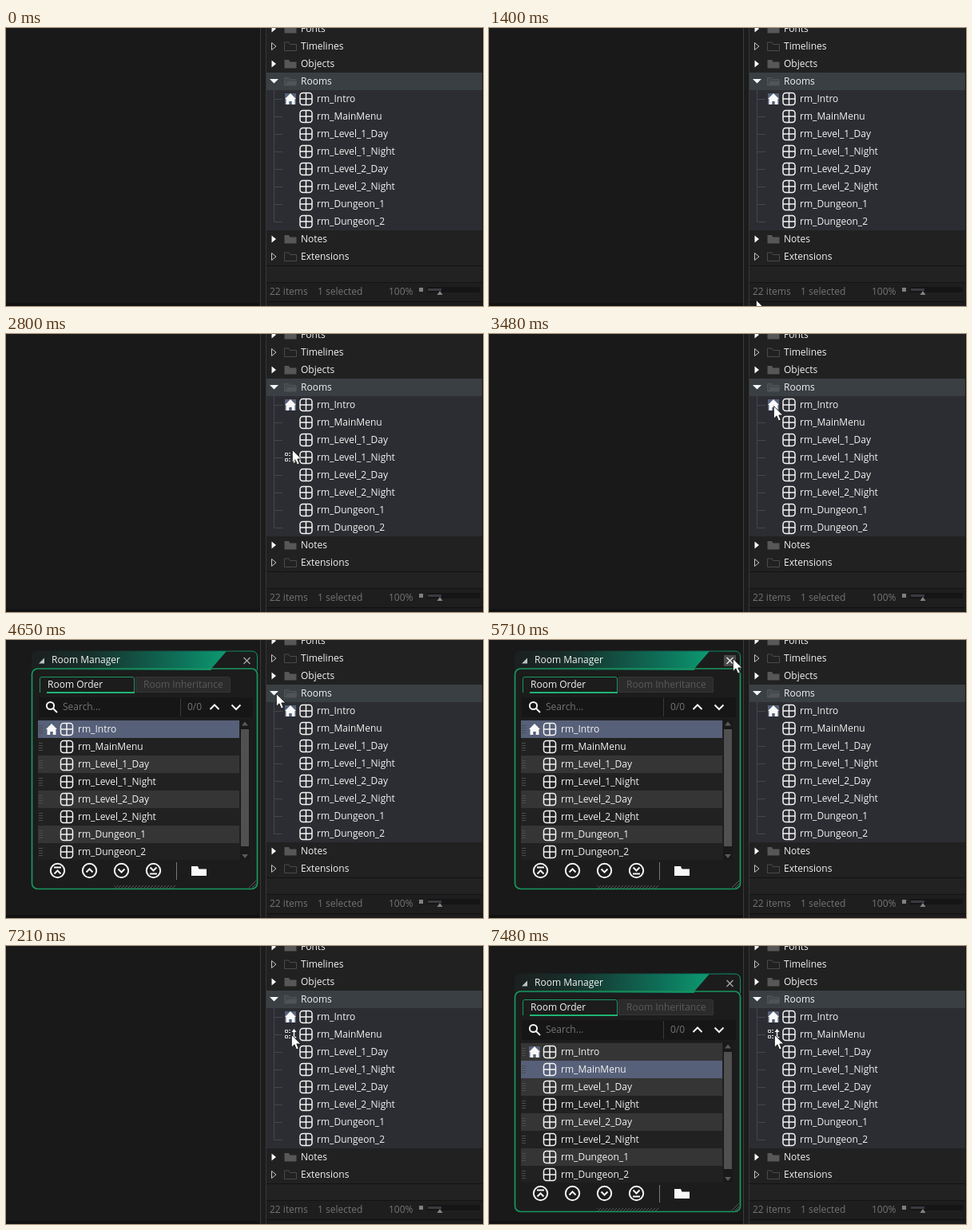
Write an HTML page that moves like this. It is 597x349 px and loops after 8000 ms.

```html
<!DOCTYPE html>
<html lang="en">
<head>
<meta charset="utf-8">
<title>Room order</title>
<style>
  html, body { margin: 0; width: 100%; height: 100%; overflow: hidden; background: #191919; }
  svg { display: block; width: 597px; height: 349px; }
  text { font: 12px "Open Sans", "Noto Sans", sans-serif; fill: #f2f2f2; white-space: pre; }
  .dim { fill: #747474; }
  .off { fill: #5a5a5a; }
  .line { fill: none; stroke: #f4f4f4; stroke-width: 1.5; }
  .bold { fill: none; stroke: #f4f4f4; stroke-width: 2; }
  .white { fill: #f8f8f8; }
  .green { fill: none; stroke: #18975f; }
  .tree { fill: none; stroke: #46474c; }
</style>
</head>
<body>
<svg id="stage" viewBox="0 0 597 349">
  <defs>
    <linearGradient id="title">
      <stop offset="0" stop-color="#1b1f1f"/>
      <stop offset=".3" stop-color="#17302b"/>
      <stop offset=".75" stop-color="#0e6f58"/>
      <stop offset="1" stop-color="#0c9a72"/>
    </linearGradient>
    <pattern id="hatch" width="4" height="4" patternUnits="userSpaceOnUse">
      <path d="M0 4L4 0" stroke="#5a5a5a"/>
    </pattern>
    <g id="room" class="line">
      <rect x="-7.5" y="-7.5" width="15" height="15" rx="3.5"/>
      <path d="M0-7.5V7.5M-7.5 0H7.5"/>
    </g>
    <g id="home">
      <rect x="-7" y="-7" width="14" height="14" fill="#566079"/>
      <path class="white" d="M0-7L7 0H5.5V7H1.7V3H-1.7V7H-5.5V0H-7Z"/>
    </g>
    <g id="order">
      <path fill="none" stroke="#d8d8d8" d="M-6.5-5.5h3v3h-3zM-6.5 1.5h3v3h-3z"/>
      <path stroke="#d8d8d8" d="M-2-5.5h2M-2-2.5h2M-2 1.5h2M-2 4.5h2"/>
      <path class="line" d="M4.5-5V5"/>
      <path class="white" d="M4.5-7L7.5-3H1.5ZM4.5 7L7.5 3H1.5Z"/>
    </g>
    <path id="folder" d="M-7.5-5H-2L-.5-2.5H7.5V5.5H-7.5Z"/>
  </defs>
  <g id="tree"></g>
  <use id="hover" href="#order"/>
  <g id="panel"></g>
  <path id="cursor" fill="#fff" stroke="#111" stroke-width=".8"
        d="M.4.5V16.2L4 12.8L6.5 18.9L9.2 17.8L6.8 11.9H11.8Z"/>
</svg>
<script>
const $ = id => document.getElementById(id);
const rooms = ["Intro", "MainMenu", "Level_1_Day", "Level_1_Night",
  "Level_2_Day", "Level_2_Night", "Dungeon_1", "Dungeon_2"].map(n => "rm_" + n);

const text = (x, y, s, cls = "") => `<text x="${x}" y="${y}" class="${cls}">${s}</text>`;
const rect = (x, y, w, h, fill, more = "") =>
  `<rect x="${x}" y="${y}" width="${w}" height="${h}" fill="${fill}" ${more}/>`;
const path = (d, more) => `<path d="${d}" ${more}/>`;
const use = (id, x, y, more = "") => `<use href="#${id}" x="${x}" y="${y}" ${more}/>`;

// A closed folder in the asset tree; empty ones are outlined.
function branch(name, y, empty) {
  const look = empty ? 'fill="none" stroke="#4a4a4a"' : 'fill="#575757"';
  const mark = empty ? 'fill="none" stroke="#c8c8c8"' : 'class="white"';
  return path(`M332.5 ${y - 4.5}L338 ${y}L332.5 ${y + 4.5}Z`, mark) +
    use("folder", 356, y, look) + text(369, y + 4, name);
}

function treeMarkup() {
  let s = rect(0, 345, 318, 4, "#121212") +
    rect(318, 0, 279, 349, "#1c1c1c") + rect(318, 0, 1, 349, "#3a3a3a") +
    rect(325, 0, 1, 349, "#363636") + rect(326, 0, 271, 298, "#212121") +
    rect(326, 298, 271, 1, "#121212") + rect(326, 299, 271, 20, "#222") +
    rect(326, 319, 271, 1, "#141414") + rect(326, 320, 271, 23, "#1e1e1e") +
    rect(326, 343, 271, 1, "#101010") +
    rect(326, 56, 270, 22, "#3a3f43") + rect(326, 78, 270, 176, "#2c2d32") +
    rect(596, 0, 1, 349, "#151515") +
    branch("Fonts", 1) + branch("Timelines", 23, true) + branch("Objects", 45) +
    branch("Notes", 265) + branch("Extensions", 287, true) +
    path("M330 64H341L335.5 69.5Z", 'class="white"') +
    path("M348.5 72V62.5H354L355.5 64.5H363V72Z", 'fill="#45494c" stroke="#505457"') +
    path("M349 72L352 67H364L363 72Z", 'fill="#505457"') +
    text(369, 71, "Rooms") + path("M335.5 78V243", 'class="tree"');
  rooms.forEach((name, i) => {
    const y = 89 + 22 * i;
    s += path(`M335.5 ${y + .5}H346`, 'class="tree"') + use("room", 375.5, y) + text(389, y + 4, name);
  });
  return s + use("home", 356, 89) +
    text(330, 335, "22 items", "dim") + text(390, 335, "1 selected", "dim") +
    text(479, 335, "100%", "dim") + rect(517, 326, 5, 5, "#808080") +
    rect(527, 325, 66, 7, "#151515") + rect(528, 327, 17, 3, "#3a3a42") +
    path("M539.5 335L543 330L546.5 335Z", 'fill="#858585"');
}

function panelMarkup() {
  let s = rect(32, 14, 283, 299, "#1c1c1c", 'rx="8"') +
    path("M32 38V21Q32 14 39 14H276L257 36V38Z", 'fill="url(#title)"') +
    path("M32.5 38V21Q32.5 14 39.5 14H307Q314.5 14 314.5 21V38", 'fill="none" stroke="url(#title)"') +
    rect(32.5, 36, 282, 276.5, "#1c1c1c", 'rx="7" class="green" stroke-width="1.7"') +
    path("M41 29.5L48 22.5V29.5Z", 'fill="#b9c2bf"') + text(57, 29, "Room Manager") +
    '<rect id="glow" x="294" y="19" width="15" height="14"/>' +
    '<path id="close" d="M297.5 22L305.5 30M305.5 22L297.5 30" stroke-width="1.3"/>' +
    path("M162.5 46.5H278Q280.5 46.5 280.5 49V65.5H162.5Z", 'fill="#2b2b2b" stroke="#343434"') +
    path("M42.5 66V48.5Q42.5 46.5 45 46.5H158Q160.5 46.5 160.5 49V66", 'class="green"') +
    rect(51, 65, 110, 2, "#1fb574") +
    text(52, 60, "Room Order") + text(172, 60, "Room Inheritance", "off") +
    rect(41, 72, 268, 25, "#161616") + rect(218, 73, 1, 23, "#3a3a3a") +
    '<circle class="bold" cx="55.5" cy="82.5" r="4.6"/>' + path("M59 86L64 91", 'class="bold"') +
    text(71, 88, "Search...", "dim") + text(227, 88, "0/0", "dim") +
    path("M255.5 87L261 81.5L266.5 87M282.5 81.5L288 87L293.5 81.5", 'class="bold"') +
    rect(40, 100, 265, 176, "#212121");
  rooms.forEach((name, i) => {
    const y = 112 + 22 * i, h = i == 7 ? 21 : 22;
    s += `<rect class="row" x="40" y="${y - 11}" width="252" height="${h}"/>`;
    for (let k = -5; k <= 4; k += 3) s += rect(41, y + k, 5, 1, "#4c4c4c");
    s += use("room", 76, y) + text(90, y + 4, name);
  });
  s += use("home", 57, 112) +
    rect(293, 100, 12, 176, "#191919") + rect(294, 112, 10, 147, "#505050") +
    path("M295 107.5L299 102.5L303 107.5ZM295 269L299 274L303 269Z", 'fill="#5a5a5a"');
  const arrows = ["M-4.5-4H4.5M-4 4L0 0L4 4", "M-4 2L0-2L4 2", "M-4-2L0 2L4-2", "M-4.5 4H4.5M-4-4L0 0L4-4"];
  arrows.forEach((d, i) => {
    s += `<g class="bold" transform="translate(${64.5 + 40 * i} 289.5)"><circle r="8.7"/>${path(d, "")}</g>`;
  });
  return s + rect(213, 279, 1, 22, "#777") +
    path("M232 284H240L241.5 287.5H251V296H232Z", 'class="white"') +
    rect(135, 308, 77, 4, "url(#hatch)") +
    path("M304 311L313 302M308 311L313 306", 'stroke="#5a5a5a"');
}

$("tree").innerHTML = treeMarkup();
$("panel").innerHTML = panelMarkup();
const rows = document.querySelectorAll(".row");

// Pointer moves: start, end, steps, from, to, acceleration.
const moves = [
  [1400, 2120, 9, [333, 345], [361, 237], 1],
  [2210, 2980, 10, [361, 237], [357, 120], 1],
  [3070, 3480, 6, [357, 120], [356, 90], 1],
  [4380, 4960, 8, [356, 91], [305, 23], 1.5],
  [6070, 6760, 9, [305, 23], [355, 111], 1],
  [7030, 7210, 2, [355, 111], [357, 111], 1]
];

function pointer(t) {
  const m = moves.filter(m => t >= m[0]).pop();
  if (!m) return null;
  const [start, end, n, a, b, power] = m;
  const k = Math.min(n - 1, Math.floor((t - start) / (end - start) * (n - 1) + 1e-6));
  const u = (k + 1) / n, e = (u * u * (3 - 2 * u)) ** power;
  return a.map((v, i) => Math.round(v + (b[i] - v) * e));
}

function show(el, on) { el.style.display = on ? "" : "none"; }

function draw(t) {
  const pos = pointer(t), cursor = $("cursor"), hover = $("hover"), panel = $("panel");
  show(cursor, pos);
  let row = -1;
  if (pos) {
    cursor.setAttribute("transform", `translate(${pos})`);
    if (pos[0] >= 348) row = Math.floor((pos[1] + 2 - 78) / 22);
  }
  show(hover, row > 0 && row < 8);
  hover.setAttribute("transform", `translate(356 ${89 + 22 * row})`);

  const second = t >= 7390;
  const opened = second ? 7390 : 3920;
  const open = second || (t >= 3920 && t < 5980);
  show(panel, open);
  if (!open) return;
  panel.setAttribute("transform", `translate(0 ${second ? 21 : 0})`);
  panel.setAttribute("opacity", t < opened + 90 ? .6 : 1);
  rows.forEach((r, i) => r.setAttribute("fill", i == +second ? "#576079" : i % 2 ? "#212121" : "#353535"));

  const over = !second && t >= 4870, press = over && t >= 5710 && t < 5800;
  $("glow").setAttribute("fill", press ? "#4a4a4a" : over ? "#303030" : "none");
  $("close").setAttribute("stroke", over ? "#f0f0f0" : "#a8a8a8");
}

function tick(now) {
  draw(now % 8000);
  requestAnimationFrame(tick);
}
draw(0);
requestAnimationFrame(tick);
</script>
</body>
</html>
```
